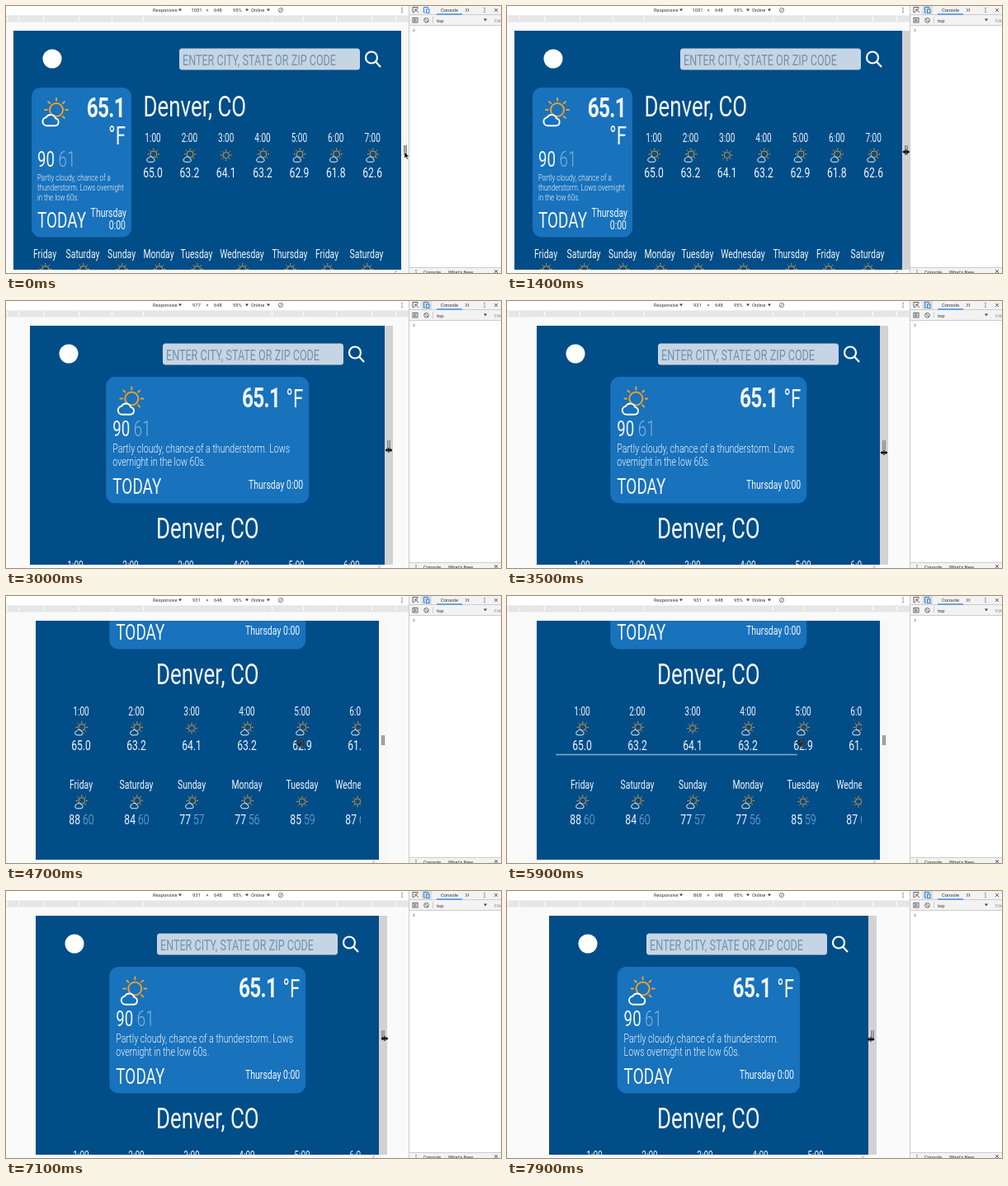
Animation, 600 px wide and 324 px high, one loop 8000 ms. Source, as an HTML page:

```html
<!DOCTYPE html>
<html lang="en">
<head>
<meta charset="utf-8">
<title>Weather page being resized</title>
<style>
  html, body { margin: 0; width: 100%; height: 100%; overflow: hidden; background: #fff; }
  svg { display: block; width: 600px; height: 324px; }
  .page text { font-family: Roboto, "Open Sans", sans-serif; font-weight: 400; fill: #f2f6fa; }
  .tools text { font: 5.8px Roboto, Inter, sans-serif; fill: #333; }
</style>
</head>
<body>
<svg viewBox="0 0 600 324">
  <defs>
    <g id="sun" fill="none" stroke="#eda02c" stroke-width="2">
      <circle r="8"/>
      <path id="rays" stroke-linecap="round"/>
    </g>
    <path id="cloud" stroke="#fff" stroke-width="2.1" transform="translate(2 3.2) scale(.9)"
      d="M6 34.5H17a5 5 0 0 0 .8-9.9A7 7 0 0 0 5 23.4a5.6 5.6 0 0 0 1 11.1z"/>
    <clipPath id="pageClip"><rect id="pageBox" y="30" height="290"/></clipPath>
    <clipPath id="rowClip"><rect id="rowBox" y="0" height="600"/></clipPath>
  </defs>
  <rect width="600" height="324" fill="#fafafa"/>

  <g class="tools">
    <rect width="488" height="11" fill="#fff"/>
    <rect y="11.5" width="488" height="8" fill="#e6e6e6"/>
    <path d="M1.5 13v5M15.5 13v5M45.5 13v5M88.5 13v5M128.5 13v5M166.5 13v5M322.5 13v5M360.5 13v5M400.5 13v5M443.5 13v5M472.5 13v5" stroke="#fff"/>
    <text x="178" y="7">Responsive</text>
    <text id="pxWidth" x="231" y="7" text-anchor="middle"></text>
    <text x="244" y="7" text-anchor="middle">×</text>
    <text x="252" y="7">648</text>
    <text x="275" y="7">95%</text>
    <text x="297" y="7">Online</text>
    <path d="M209 3.5h4l-2 3zM290 3.5h4l-2 3zM316 3.5h4l-2 3z" fill="#444"/>
    <g fill="none" stroke="#666" stroke-width=".8"><circle cx="333" cy="5" r="2.6"/><path d="M331 7l4-4"/></g>
    <path d="M480 2v1.2M480 4.4v1.2M480 6.8V8" stroke="#555" stroke-width="1.2"/>
  </g>

  <g id="strip">
    <rect y="30" width="10" height="290"/>
    <rect x="3" y="169" width="4" height="12" fill="#aaa"/>
    <path d="M3.5 169v12M6.500 169v12" stroke="#888"/>
    <path d="M-8 323.500l3-2" stroke="#999"/>
  </g>

  <g class="page" id="page" clip-path="url(#pageClip)"></g>

  <g class="tools">
    <rect x="488" width="112" height="324" fill="#fff"/>
    <path d="M489 0h111v23h-111zM489 317.500h111v7h-111z" fill="#f3f3f3"/>
    <path d="M488.500 0v324M489 10.500h111M489 23.500h111M489 317.500h111M517.500 13v8" stroke="#ccc" fill="none"/>
    <rect id="active" x="503.500" width="12.500" height="10" fill="#dcdcdc"/>
    <g fill="none" stroke="#555" stroke-width=".9">
      <path d="M499 3V1.500h-6v6h2M496 4l4 4M496 7V4h3"/>
      <rect x="493" y="14.500" width="6" height="5.500"/><path d="M495 15.800l2.500 1.500-2.500 1.500z"/>
      <circle cx="509.500" cy="17.300" r="2.800"/><path d="M507.500 15.300l4 4"/>
      <path d="M559.500 3l1.500 2-1.500 2M557 3l1.500 2-1.500 2M592 3l4 4M596 3l-4 4M592 320l4 4M596 320l-4 4"/>
    </g>
    <g fill="none" stroke="#2a84e8"><path d="M508 8h-1.500V1.500h5V3"/><rect x="509.500" y="4" width="3.500" height="4.500"/><path d="M522 10h31" stroke-width="1.300"/><path d="M493.500 28l1.800 1.500-1.800 1.500"/></g>
    <text x="527" y="7">Console</text>
    <path d="M580 2v1.200M580 4.400v1.200M580 6.800V8M497 320v1.200M497 322.400v1.200" stroke="#555" stroke-width="1.200"/>
    <text x="522" y="19.500">top</text>
    <path d="M579 15.500h4l-2 3z" fill="#444"/>
    <text x="592" y="19.500" style="fill:#888">Filter</text>
    <text x="506" y="325">Console</text>
    <text x="536" y="325">What's New</text>
  </g>

  <g id="cursor">
    <path data-kind="arrow" d="M0 0v8l1.900-1.700 1.300 2.900 1.300-.6-1.300-2.800h2.500z" stroke="#fff" stroke-width=".6"/>
    <path data-kind="resize" d="M-4.500 0l2.800-2.300v1.500h3.400v-1.500L4.500 0 1.700 2.300V.8h-3.400v1.500zM-.6-3h1.200v6h-1.200z"/>
    <circle data-kind="touch" r="5.200" fill="#1d2630" fill-opacity=".75" stroke="#5b6c7d" stroke-opacity=".6"/>
  </g>
</svg>

<script>
const LOOP = 8000, STEP = 100, CENTER = 244.3;
const BLUE = '#014d88', CARD = '#1872bc', DIM = '#83b1dd', CONDENSE = .72;
const get = id => document.getElementById(id);

get('rays').setAttribute('d', Array.from({ length: 8 }, (_, i) => {
  const x = Math.cos(i * Math.PI / 4), y = Math.sin(i * Math.PI / 4);
  return `M${x * 11.2} ${y * 11.2}L${x * 14} ${y * 14}`;
}).join(''));

// Keyed values: rows of [time, value, value...]
const widthKeys = [[1900, 470], [2100, 450.3], [2200, 444], [2800, 444], [3200, 416.35], [7300, 416.35], [7800, 388.2], [7900, 387]];
const scrollKeys = [[3800, 0], [4300, 181], [6500, 181], [6900, 0]];
const rowKeys = [[4900, 0], [5300, 98], [5450, 98], [5800, 0]];
const cursorKeys = [[0, 483, 177], [1900, 484, 177], [2200, 471, 176], [2800, 471, 178], [3200, 457, 184], [3700, 457, 184],
  [4000, 357, 178], [6500, 357, 178], [7000, 459, 179], [7300, 459, 179], [7800, 441, 180]];
const linear = k => k, smooth = k => k * k * (3 - 2 * k);

function at(keys, t, ease = linear) {
  const i = keys.findIndex(k => k[0] > t);
  if (i === 0) return keys[0].slice(1);
  if (i < 0) return keys[keys.length - 1].slice(1);
  const a = keys[i - 1], b = keys[i], k = ease((t - a[0]) / (b[0] - a[0]));
  return a.slice(1).map((v, j) => v + (b[j + 1] - v) * k);
}

function text(x, y, size, str, anchor = 'start', style = '') {
  return `<text transform="translate(${x} ${y}) scale(${CONDENSE} 1)" font-size="${size}" text-anchor="${anchor}" style="${style}">${str}</text>`;
}
const rect = (x, y, w, h, r, fill) => `<rect x="${x}" y="${y}" width="${w}" height="${h}" rx="${r}" fill="${fill}"/>`;
const partly = (x, y, scale, back) =>
  `<g transform="translate(${x} ${y}) scale(${scale})"><use href="#sun" x="19" y="15"/><use href="#cloud" fill="${back}"/></g>`;
const sunny = (x, y) => `<use href="#sun" transform="translate(${x} ${y}) scale(.46)"/>`;
const smallIcon = (x, y, clear) => clear ? sunny(x, y + 8.5) : partly(x - 8.5, y, .49, BLUE);

const temps = ['65.0', '63.2', '64.1', '63.2', '62.9', '61.8', '62.6'];
const week = ['Friday', 'Saturday', 'Sunday', 'Monday', 'Tuesday', 'Wednesday', 'Thursday', 'Friday', 'Saturday'];
const weekX = [38, 84, 131, 176, 222, 277, 335, 380, 428];
const highLow = [[88, 60], [84, 60], [77, 57], [77, 56], [85, 59], [87, 61]];

const hours = (x, gap, y) => temps.map((deg, i) => {
  const cx = x + gap * i;
  return text(cx, y, 14, `${i + 1}:00`, 'middle') + smallIcon(cx, y + 7.5, i === 2) + text(cx, y + 42.5, 16.9, deg, 'middle');
}).join('');

function header(left, right) {
  const box = right - 269;
  return `<circle cx="${left + 47}" cy="64" r="11.5" fill="#fff"/>`
    + rect(box, 51.5, 219, 26, 3.5, '#c6d5e3')
    + text(box + 4, 72, 17.5, 'ENTER CITY, STATE OR ZIP CODE', 'start', 'fill:#7391ae')
    + `<g transform="translate(${right - 36} 62.5)" fill="none" stroke="#fff" stroke-width="2.2"><circle r="7"/><path d="M5 5l6 6.5"/></g>`;
}

const range = (x, y) => text(x, y, 26, '90') + text(x + 25.5, y, 26, '61', 'start', `fill:${DIM};font-weight:300`);
const now = (x, y) => text(x, y, 34, '65.1', 'end', 'font-weight:700;letter-spacing:-1px');
const lines = (x, y, gap, size, list) => list.map((s, i) => text(x, y + gap * i, size, s, 'start', 'font-weight:300')).join('');

function wide(left, w) {
  const k = w / 470, cl = left + 22, cw = 121 * k, cr = cl + cw, tx = cl + 7;
  return header(left, left + w)
    + rect(cl, 99, cw, 181.5, 11, CARD)
    + partly(left + 33, 111, 1, CARD)
    + now(cr - 8, 135) + text(cr - 7, 168, 31, '°F', 'end')
    + range(tx, 195)
    + lines(tx, 211.5, 12, 11.1, ['Partly cloudy, chance of a', 'thunderstorm. Lows overnight', 'in the low 60s.'])
    + text(tx, 269, 26.3, 'TODAY') + text(cr - 6, 255.5, 14.6, 'Thursday', 'end') + text(cr - 7, 271, 14.6, '0:00', 'end')
    + text(left + 157.5, 134, 36, 'Denver, CO')
    + hours(left + 169 * k, 44.35 * k, 165)
    + week.map((d, i) => {
      const x = left + weekX[i] * k;
      return text(x, 305.5, 14.5, d, 'middle') + partly(x - 8.5, 312, .49, BLUE);
    }).join('');
}

function narrow(left, right, scroll, slide, bar) {
  const w = right - left, cw = w * .572, cl = CENTER - cw / 2, cr = cl + cw, tx = cl + 8;
  const words = cw > 230
    ? ['Partly cloudy, chance of a thunderstorm. Lows', 'overnight in the low 60s.']
    : ['Partly cloudy, chance of a thunderstorm.', 'Lows overnight in the low 60s.'];
  const rowW = w - 45, x0 = left + 55;
  return `<g transform="translate(0 ${-scroll})">` + header(left, right)
    + rect(cl, 92, cw, 153.5, 11, CARD)
    + partly(cl + 12, 103.5, 1, CARD)
    + now(cr - 35, 129) + text(cr - 7, 129, 31, '°F', 'end')
    + range(tx, 164)
    + lines(tx, 184, 16, 14.8, words)
    + text(tx, 234, 26.3, 'TODAY') + text(cr - 7, 228, 14.6, 'Thursday 0:00', 'end')
    + text(CENTER, 287.5, 36, 'Denver, CO', 'middle')
    + '<g clip-path="url(#rowClip)">'
    + `<g transform="translate(${-slide} 0)">${hours(x0, 67, 325.5)}</g>`
    + `<g opacity="${bar}">${rect(left + 23 + slide * rowW / 470, 372.8, rowW * rowW / 470, 1.5, .7, '#8ea9c3')}</g>`
    + highLow.map(([hi, lo], i) => {
      const x = x0 + 67 * i;
      return text(x, 415, 14.5, week[i], 'middle') + smallIcon(x, 422, i > 3)
        + text(x - 1, 457.5, 16.9, hi, 'end') + text(x + 2, 457.5, 16.9, lo, 'start', `fill:${DIM};font-weight:300`);
    }).join('') + '</g></g>';
}

function span(id, x, w) {
  get(id).setAttribute('x', x);
  get(id).setAttribute('width', w);
}

function draw(t) {
  const [width] = at(widthKeys, t);
  const left = Math.round(CENTER - width / 2), right = Math.round(CENTER + width / 2), w = right - left;
  const [scroll] = at(scrollKeys, t, smooth), [slide] = at(rowKeys, t, smooth);
  const bar = t < 4900 ? 0 : Math.max(0, Math.min(1, (6300 - t) / 200));
  const [cx, cy] = at(cursorKeys, t);
  const hover = t >= 300 && (t < 3800 || t >= 7000);
  const kind = t < 300 ? 'arrow' : hover ? 'resize' : 'touch';

  span('pageBox', left, w);
  span('rowBox', left + 23, w - 45);
  get('page').innerHTML = rect(left, 30, w, 290, 0, BLUE)
    + (w > 440 ? wide(left, Math.max(w, 467)) : narrow(left, right, scroll, slide, bar));
  get('pxWidth').textContent = Math.round(1051 * at(widthKeys, t - STEP)[0] / 470);
  get('strip').setAttribute('transform', `translate(${right} 0)`);
  get('strip').firstElementChild.setAttribute('fill', hover ? '#d2d2d2' : '#f7f7f7');
  get('active').style.display = t < 500 ? 'none' : '';
  get('cursor').setAttribute('transform', `translate(${cx} ${cy})`);
  for (const el of get('cursor').children) el.style.display = el.dataset.kind === kind ? '' : 'none';
}

const start = performance.now();
let last = -1;
function tick() {
  const t = Math.floor((performance.now() - start) % LOOP / STEP) * STEP;
  if (t !== last) draw(last = t);
  requestAnimationFrame(tick);
}
tick();
</script>
</body>
</html>
```
